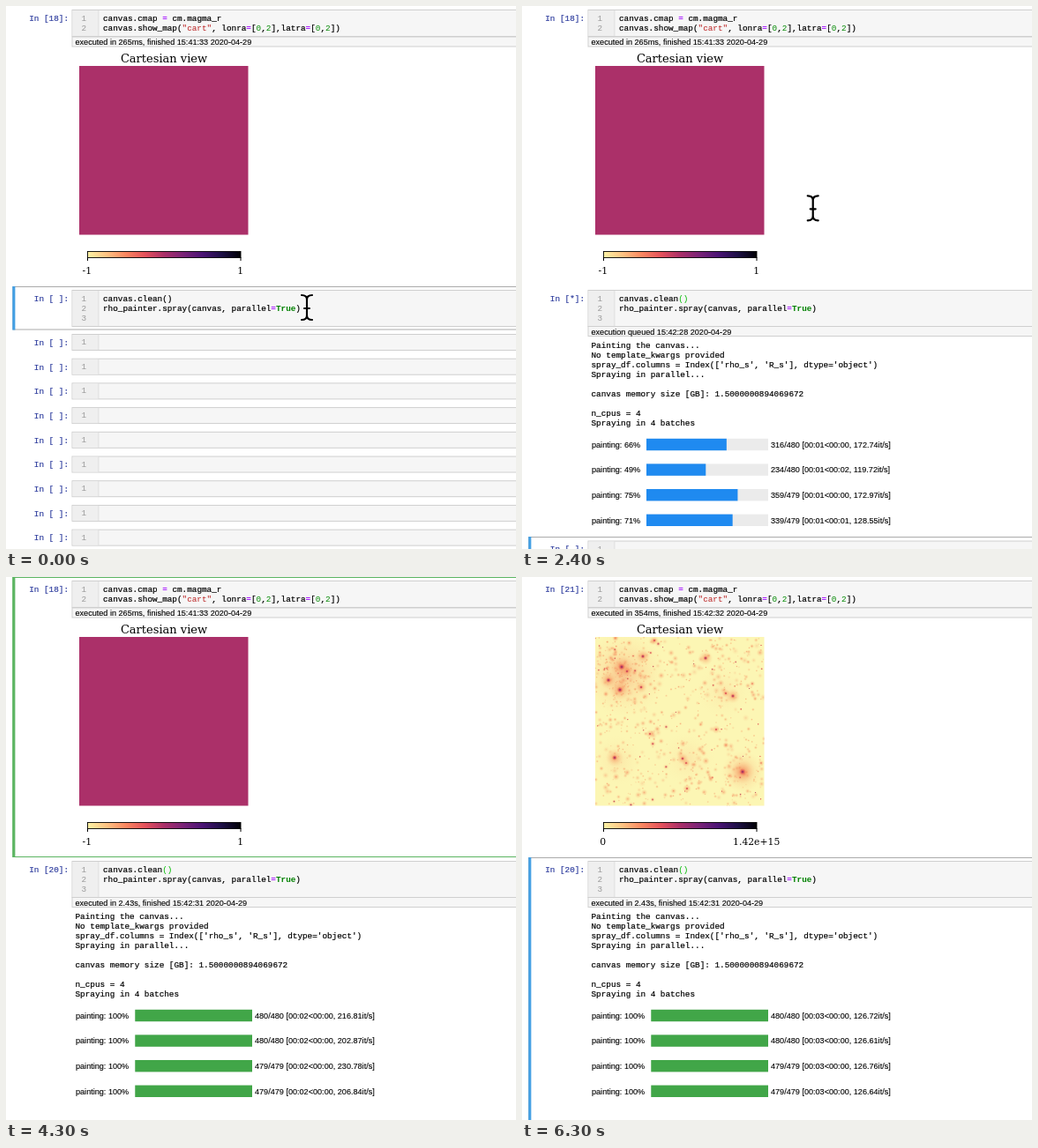
An HTML page for the animation above (6400 ms loop, 578 by 616 pixels).

```html
<!DOCTYPE html>
<html lang="en">
<head>
<meta charset="utf-8">
<title>Notebook run</title>
<style>
  html, body { margin: 0; width: 100%; height: 100%; overflow: hidden; background: #fff; }
  svg { display: block; width: 578px; height: 616px; }
  text { white-space: pre; }
  .mono { font: 9.33px "Liberation Mono", monospace; stroke: currentColor; stroke-width: .2px; }
  .sans { font: 9.1px "Liberation Sans", sans-serif; stroke: currentColor; stroke-width: .12px; }
  .serif { font: 10.8px "DejaVu Serif", serif; }
  .title { font-size: 13px; }
  .prompt { fill: #303f9f; color: #303f9f; }
  .num { fill: #999; stroke: none; }
  .op { fill: #a2f; font-weight: bold; stroke: none; }
  .str { fill: #ba2121; stroke: none; }
  .int { fill: #080; stroke: none; }
  .kw { fill: #008000; font-weight: bold; stroke: none; }
  .match { fill: #0b0; stroke: none; }
</style>
</head>
<body>
<svg viewBox="0 0 578 616">
  <defs>
    <linearGradient id="magma"></linearGradient>
    <radialGradient id="glow">
      <stop offset="0" stop-color="#f0714f" stop-opacity=".75"/>
      <stop offset=".4" stop-color="#f6935f" stop-opacity=".4"/>
      <stop offset="1" stop-color="#fbc685" stop-opacity="0"/>
    </radialGradient>
    <radialGradient id="core">
      <stop offset="0" stop-color="#7a1d60"/>
      <stop offset=".4" stop-color="#d84a58" stop-opacity=".8"/>
      <stop offset="1" stop-color="#f58a5c" stop-opacity="0"/>
    </radialGradient>
    <clipPath id="mapClip"><rect width="191.5" height="191.5"/></clipPath>
  </defs>
  <g id="notebook"></g>
  <g id="map" transform="translate(83 68)" clip-path="url(#mapClip)"></g>
  <g id="pointer" fill="none" stroke-linecap="round"></g>
</svg>
<script>
const LOOP = 6400, STEP = 100;
const CLICK_CELL = 200, QUEUED = 800, TEXT_OUT = 1200, BARS_OUT = 1400, DONE = 3300;
const CLICK_TOP = 3600, HIDE_POINTER = 4000, RERUN = 4400, REDRAWN = 4700;
const FADE = 600, PAINT_START = 930;
const BLUE = '#429fe3', GREEN = '#5cb562', GRAY = '#ababab', LINE = '#cfcfcf';

const $ = id => document.getElementById(id);
const clamp = v => Math.max(0, Math.min(1, v));
const esc = s => s.replace(/&/g, '&amp;').replace(/</g, '&lt;');
const text = (cls, x, y, s, extra = '') => `<text class="${cls}" x="${x}" y="${y}" ${extra}>${s}</text>`;
const rect = (x, y, w, h, fill, extra = '') =>
  `<rect x="${x}" y="${y}" width="${w}" height="${h}" fill="${fill}" ${extra}/>`;
const END = 'text-anchor="end"', MIDDLE = 'text-anchor="middle"';

// Piecewise linear curve through [time, value] points
function along(points, t) {
  let [t0, v0] = points[0];
  for (const [t1, v1] of points) {
    if (t < t1) return v0 + (v1 - v0) * clamp((t - t0) / (t1 - t0));
    [t0, v0] = [t1, v1];
  }
  return v0;
}

const MAGMA = ['#fcf2a5', '#fec383', '#fb8761', '#e4525c', '#ab3069', '#7a2478', '#4b1475', '#1d1046', '#000004'];
$('magma').innerHTML = MAGMA.map((c, i) => `<stop offset="${i / 8}" stop-color="${c}"/>`).join('');

function buildMap() {
  let seed = 29;
  const rnd = () => {
    seed = (seed * 1664525 + 1013904223) >>> 0;
    return seed / 4294967296;
  };
  const dot = (x, y, r, fill, o = 1) =>
    `<circle cx="${x.toFixed(1)}" cy="${y.toFixed(1)}" r="${r.toFixed(1)}" fill="url(#${fill})" opacity="${o.toFixed(2)}"/>`;
  let out = rect(0, 0, 192, 192, '#fcf6b4');
  out += dot(32, 42, 48, 'glow', .5) + dot(167, 153, 24, 'glow', .6) +
    dot(105, 138, 30, 'glow', .16) + dot(25, 140, 28, 'glow', .18) + dot(145, 62, 30, 'glow', .14);
  for (let i = 0; i < 850; i++) {
    const near = rnd() < .16;
    const x = near ? 32 + (rnd() + rnd() - 1) * 45 : rnd() * 192;
    const y = near ? 42 + (rnd() + rnd() - 1) * 45 : rnd() * 192;
    const size = rnd() ** 3;
    out += dot(x, y, 1.4 + size * 3, 'glow', .25 + rnd() * .6);
    if (rnd() < .07) out += dot(x, y, 1.1 + size, 'core', .7);
  }
  const halos = [[30, 34, 8], [54, 22, 5], [15, 49, 6], [28, 60, 7], [36, 39, 4], [125, 24, 5],
    [156, 67, 5], [148, 64, 3], [22, 137, 6], [167, 153, 8], [103, 143, 3], [99, 138, 4],
    [67, 4, 3], [178, 53, 2], [104, 172, 3], [52, 57, 4], [62, 110, 3], [137, 105, 3], [188, 143, 2]];
  for (const [x, y, r] of halos) out += dot(x, y, r * 1.7, 'glow', .9) + dot(x, y, r * .5, 'core');
  return out;
}
$('map').innerHTML = buildMap();

const BEAM = 'M-6-14Q0-14 0-9Q0-14 6-14M0-9V9M-6 14Q0 14 0 9Q0 14 6 14M-3 1H3';
$('pointer').innerHTML = `<path d="${BEAM}" stroke="#fff" stroke-width="4"/><path d="${BEAM}" stroke="#000" stroke-width="2.2"/>`;

const highlight = line => line.replace(/(".*?")|(True)|(\d)|(=)/g, (s, str, kw, int) =>
  `<tspan class="${str ? 'str' : kw ? 'kw' : int ? 'int' : 'op'}">${s}</tspan>`);

// Input box with prompt; y is the top of the cell frame
function inputCell(y, prompt, lines) {
  const h = lines.length * 11 + 8, top = y + 4.5;
  return rect(75, top, 520, h, '#f6f6f6', `stroke="${LINE}"`) +
    rect(75.5, top + .5, 29, h - 1, '#efefef') + rect(104.5, top + .5, .8, h - 1, '#d8d8d8') +
    text('mono prompt', 71, y + 17, `In [${prompt}]:`, END) +
    lines.map((line, i) => text('mono num', 91, y + 16.5 + i * 11, i + 1, END) +
      text('mono', 110, y + 17 + i * 11, line)).join('');
}

function emptyCell(y) {
  return rect(75, y + 4.5, 520, 18, '#f6f6f6', `stroke="${LINE}"`) +
    rect(75.5, y + 5, 29, 17, '#efefef') + rect(104.5, y + 5, .8, 17, '#d8d8d8') +
    text('mono prompt', 71, y + 16.8, 'In [ ]:', END) + text('mono num', 91, y + 16, 1, END);
}

function execRow(y, label, flash) {
  return rect(75, y, 520, 11, '#f6f6f6', `stroke="${LINE}"`) +
    rect(75, y + .5, 520, 10.5, '#08b008', `opacity="${flash}"`) + text('sans', 78.5, y + 9.2, label);
}

const frame = (y, h, edit) =>
  rect(8, y, 600, h, 'none', `stroke="${edit ? GREEN : GRAY}"`) + rect(7.3, y - .5, 3.1, h + 1, edit ? GREEN : BLUE);

const flashAt = (t, start) => t < start ? 0 : 1 - clamp((t - start) / FADE);

function plot(drawn) {
  const [low, high] = drawn ? ['0', '1.42e+15'] : ['-1', '1'];
  return text('serif title', 179, 64, 'Cartesian view', MIDDLE) +
    (drawn ? '' : rect(83, 68, 191.5, 191.5, '#ab3069')) +
    rect(92.5, 278.5, 173.5, 7, 'url(#magma)', 'stroke="#000" stroke-width=".9"') +
    rect(92, 285, 1, 4, '#000') + rect(265.5, 285, 1, 4, '#000') +
    text('serif', 91.8, 303.5, low, MIDDLE) + text('serif', 265.7, 303.5, high, MIDDLE);
}

const LOG = ['Painting the canvas...', 'No template_kwargs provided',
  "spray_df.columns = Index(['rho_s', 'R_s'], dtype='object')", 'Spraying in parallel...', '',
  'canvas memory size [GB]: 1.5000000894069672', '', 'n_cpus = 4', 'Spraying in 4 batches'];

const WORKERS = [
  { total: 480, count: [[1300, 0], [1700, 125], [3000, 480]], rate: [[1700, 123.43], [3000, 215]], mean: 216.81, last: 126.72 },
  { total: 480, count: [[1300, 0], [1700, 108], [3100, 360], [DONE, 480]], rate: [[1700, 42.39], [3100, 197.05]], mean: 202.87, last: 126.61 },
  { total: 479, count: [[1300, 0], [1700, 192], [2900, 479]], rate: [[1700, 95.92], [2900, 228]], mean: 230.78, last: 126.76 },
  { total: 479, count: [[1300, 0], [1700, 227], [3100, 450], [DONE, 479]], rate: [[1700, 69.22], [3100, 187.88]], mean: 206.84, last: 126.64 },
];

const clock = s => '00:' + String(Math.floor(s)).padStart(2, '0');

function progress(worker, y, t) {
  const { total } = worker, n = Math.round(along(worker.count, t)), full = n >= total;
  const closed = t >= REDRAWN;
  const rate = closed ? worker.last : full ? worker.mean : along(worker.rate, t);
  const elapsed = closed ? 3 : full ? 2 : (t - PAINT_START) / 1000;
  const percent = Math.floor(n / total * 100 + .5);
  const left = 131 + 5 * String(percent).length + (full ? .3 : 0), width = 279 - left;
  const status = `${n}/${total} [${clock(elapsed)}<${clock((total - n) / rate)}, ${rate.toFixed(2)}it/s]`;
  return text('sans', 79, y + 3.4, `painting: ${percent}%`) +
    rect(left, y - 6.5, width, 13.4, '#ebebeb') +
    rect(left, y - 6.5, width * n / total, 13.4, full ? '#41a648' : '#1f8af0') +
    text('sans', 282, y + 3.4, esc(status));
}

function topCell(t) {
  const running = t >= RERUN && t < REDRAWN, drawn = t >= REDRAWN;
  const code = ['canvas.cmap = cm.magma_r', 'canvas.show_map("cart", lonra=[0,2],latra=[0,2])'].map(highlight);
  const label = running ? 'execution queued 15:42:32 2020-04-29'
    : drawn ? 'executed in 354ms, finished 15:42:32 2020-04-29' : 'executed in 265ms, finished 15:41:33 2020-04-29';
  return (t >= CLICK_TOP && t < RERUN ? frame(.5, 317, true) : '') +
    inputCell(0, running ? '*' : drawn ? 21 : 18, code) +
    execRow(35, label, flashAt(t, REDRAWN)) + (running ? '' : plot(drawn));
}

function sprayCell(t) {
  const queued = t >= QUEUED, done = t >= DONE;
  const call = t < CLICK_CELL ? '()' : '<tspan class="match">()</tspan>';
  const code = ['canvas.clean' + call, highlight('rho_painter.spray(canvas, parallel=True)'), ''];
  const nextTop = done ? 642 : t >= BARS_OUT ? 602.5 : t >= TEXT_OUT ? 486 : queued ? 380 : 368;
  let out = '';
  if (!queued) out += frame(318.5, 48.5, t >= CLICK_CELL);
  if (t >= RERUN) out += frame(318.5, 320, false);
  if (queued && !done) out += frame(nextTop, 26, false);
  out += inputCell(318, done ? 20 : queued ? '*' : ' ', code);
  if (queued) {
    out += execRow(363.5, done ? 'executed in 2.43s, finished 15:42:31 2020-04-29'
      : 'execution queued 15:42:28 2020-04-29', flashAt(t, DONE));
  }
  if (t >= TEXT_OUT) out += LOG.map((line, i) => text('mono', 78.5, 388 + i * 11, line)).join('');
  if (t >= BARS_OUT) out += WORKERS.map((w, i) => progress(w, 497.3 + i * 28.6, t)).join('');
  for (let i = 0; i < 10; i++) out += emptyCell(nextTop + i * 27.7);
  return out;
}

function draw(t) {
  const lift = t >= RERUN && t < REDRAWN ? -267 : 0;
  $('notebook').innerHTML = topCell(t) + `<g transform="translate(0 ${lift})">${sprayCell(t)}</g>`;
  $('map').style.display = t >= REDRAWN ? '' : 'none';

  const visible = t < QUEUED || (t >= 2300 && t < HIDE_POINTER);
  const k = clamp((t - 2200) / 500), eased = k * k * (3 - 2 * k);
  $('pointer').style.display = visible ? '' : 'none';
  $('pointer').setAttribute('transform', `translate(${341 - 32 * eased} ${342 - 320 * eased})`);
}

const start = performance.now();
let shown = -1;
function tick() {
  const t = Math.floor((performance.now() - start) % LOOP / STEP) * STEP;
  if (t !== shown) draw(shown = t);
  requestAnimationFrame(tick);
}
tick();
</script>
</body>
</html>
```
